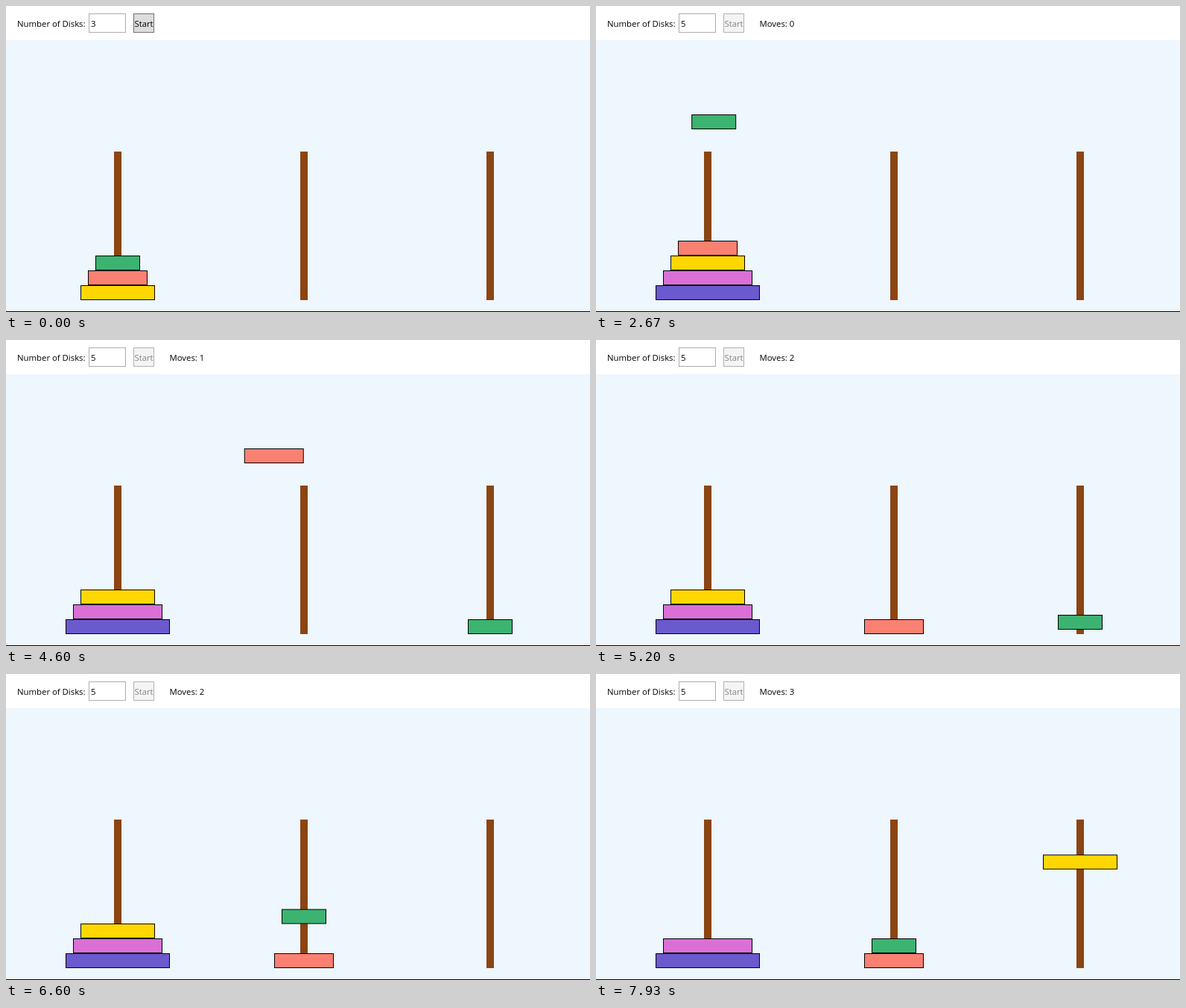
Write an HTML page that moves like this. It is 784 by 412 pixels and loops after 8 s.

```html
<!DOCTYPE html>
<html lang="en">
<head>
<meta charset="utf-8">
<title>Towers of Hanoi</title>
<style>
  html, body { margin: 0; width: 100%; height: 100%; overflow: hidden; background: #fff; }
  svg { display: block; }
  text { font: 11.35px "Open Sans", "Noto Sans", sans-serif; }
  .peg { fill: #8b4513; }
  .disk { stroke: #000; }
  .off { display: none; }
  #field { fill: #fff; stroke: #abadb3; }
  #field.focus { stroke: #569de5; }
  #start rect { fill: #ddd; stroke: #707070; }
  #start.hover rect { fill: #bee6fd; stroke: #3c7fb1; }
  #start.disabled rect { fill: #f4f4f4; stroke: #adb2b5; }
  #start.disabled text { fill: #838383; }
</style>
</head>
<body>
<svg width="784" height="412" viewBox="0 0 784 412">
  <rect y="46" width="784" height="365" fill="#eef6fe"/>
  <rect y="411" width="784" height="1"/>
  <text x="15" y="28">Number of Disks:</text>
  <rect id="field" x="111.5" y="10.5" width="49" height="25"/>
  <rect id="selection" x="114" y="15" width="7" height="16" fill="#99c9ef"/>
  <text id="value" x="114" y="28"></text>
  <rect id="caret" x="120" y="15" width="1" height="16"/>
  <g id="start">
    <rect x="171.5" y="10.5" width="27" height="25"/>
    <text x="185" y="28" text-anchor="middle">Start</text>
  </g>
  <text id="moves" x="219.5" y="28"></text>
  <g id="tower"></g>
  <g id="pointer">
    <path id="arrow" d="M.5 .5V16L4 12.8 6.6 18.6 9 17.5 6.5 11.8H11.2Z" fill="#fff" stroke="#000"/>
    <path id="beam" d="M-3 -7.5H3M0 -7.5V7.5M-3 7.5H3" fill="none" stroke="#000"/>
  </g>
</svg>
<script>
const LOOP = 8000, FRAME = 200 / 3;
const CLICK = 2100, TYPED = 1500, FOCUS = 1100;
const STAGE = 503.5, TRAVEL = 500;   // each move: lift, carry, drop
const TOP = 146, FLOOR = 376, THICK = 20;
const COLORS = ["#3cb371", "#fa8072", "#ffd700", "#da70d6", "#6a5acd"];
const MOVES = [
  { at: 2155, from: 0, to: 2 },
  { at: 3677, from: 0, to: 1 },
  { at: 5187, from: 2, to: 1 },
  { at: 6715, from: 0, to: 2 },
];
const POINTER = [   // time, x, y
  [800, 180, 17], [930, 122, 22], [1130, 122, 22], [1330, 106, 24], [1530, 106, 24],
  [1633, 130, 26], [1733, 164.5, 27], [1933, 184, 26], [2200, 184, 27], [2600, 230, 412],
];

const $ = id => document.getElementById(id);
const show = (id, on) => $(id).classList.toggle("off", !on);
const lerp = (a, b, k) => a + (b - a) * k;
const pegX = peg => 150 + 250 * peg;
const levelY = level => FLOOR - THICK * level;

function addRect(attributes) {
  const rect = document.createElementNS("http://www.w3.org/2000/svg", "rect");
  for (const name in attributes) rect.setAttribute(name, attributes[name]);
  return $("tower").appendChild(rect);
}

for (let peg = 0; peg < 3; peg++)
  addRect({ class: "peg", x: pegX(peg) - 5, y: 196, width: 10, height: 200 });

const disks = COLORS.map((fill, i) =>
  addRect({ class: "disk", fill, width: 59 + 20 * i, height: THICK - 1 }));

function place(disk, x, y) {
  disks[disk].setAttribute("x", x - 30 - 10 * disk + 0.5);
  disks[disk].setAttribute("y", y + 0.5);
}

function drawTower(t) {
  const count = t < CLICK ? 3 : 5;
  const pegs = [[], [], []];
  for (let i = count - 1; i >= 0; i--) pegs[0].push(i);
  disks.forEach((disk, i) => disk.classList.toggle("off", i >= count));

  let done = 0, flying = null;
  for (const { at, from, to } of MOVES) {
    if (t < at) break;
    const part = stage => Math.min(1, Math.max(0, (t - at - stage * STAGE) / TRAVEL));
    const disk = pegs[from].pop();
    const x = lerp(pegX(from), pegX(to), part(1));
    const y = part(2) > 0
      ? lerp(TOP, levelY(pegs[to].length), part(2))
      : lerp(levelY(pegs[from].length), TOP, part(0));
    pegs[to].push(disk);
    flying = { disk, x, y };
    if (part(2) === 1) done++;
  }
  pegs.forEach((stack, peg) =>
    stack.forEach((disk, level) => place(disk, pegX(peg), levelY(level))));
  if (flying) place(flying.disk, flying.x, flying.y);
  $("moves").textContent = t < CLICK ? "" : "Moves: " + done;
}

function drawPointer(t) {
  const next = POINTER.findIndex(key => key[0] > t);
  show("pointer", next > 0);
  if (next < 1) return;
  const [t0, x0, y0] = POINTER[next - 1], [t1, x1, y1] = POINTER[next];
  const k = (t - t0) / (t1 - t0);
  const x = lerp(x0, x1, k), y = lerp(y0, y1, k);
  $("pointer").setAttribute("transform", `translate(${x} ${y})`);
  show("beam", x < 161);
  show("arrow", x >= 161);
  $("start").classList.toggle("hover", x > 171 && y < 36 && t < CLICK);
}

function draw(t) {
  const focused = t >= FOCUS && t < CLICK;
  $("field").classList.toggle("focus", focused);
  $("value").textContent = t < TYPED ? "3" : "5";
  show("caret", focused);
  show("selection", t > 1300 && t < TYPED);
  $("start").className.baseVal = t < CLICK ? "" : "disabled";
  drawTower(t);
  drawPointer(t);
}

function tick() {
  const t = performance.now() % LOOP;
  draw(Math.min(119, Math.floor((t + 5) / FRAME)) * FRAME);
  requestAnimationFrame(tick);
}
tick();
</script>
</body>
</html>
```
